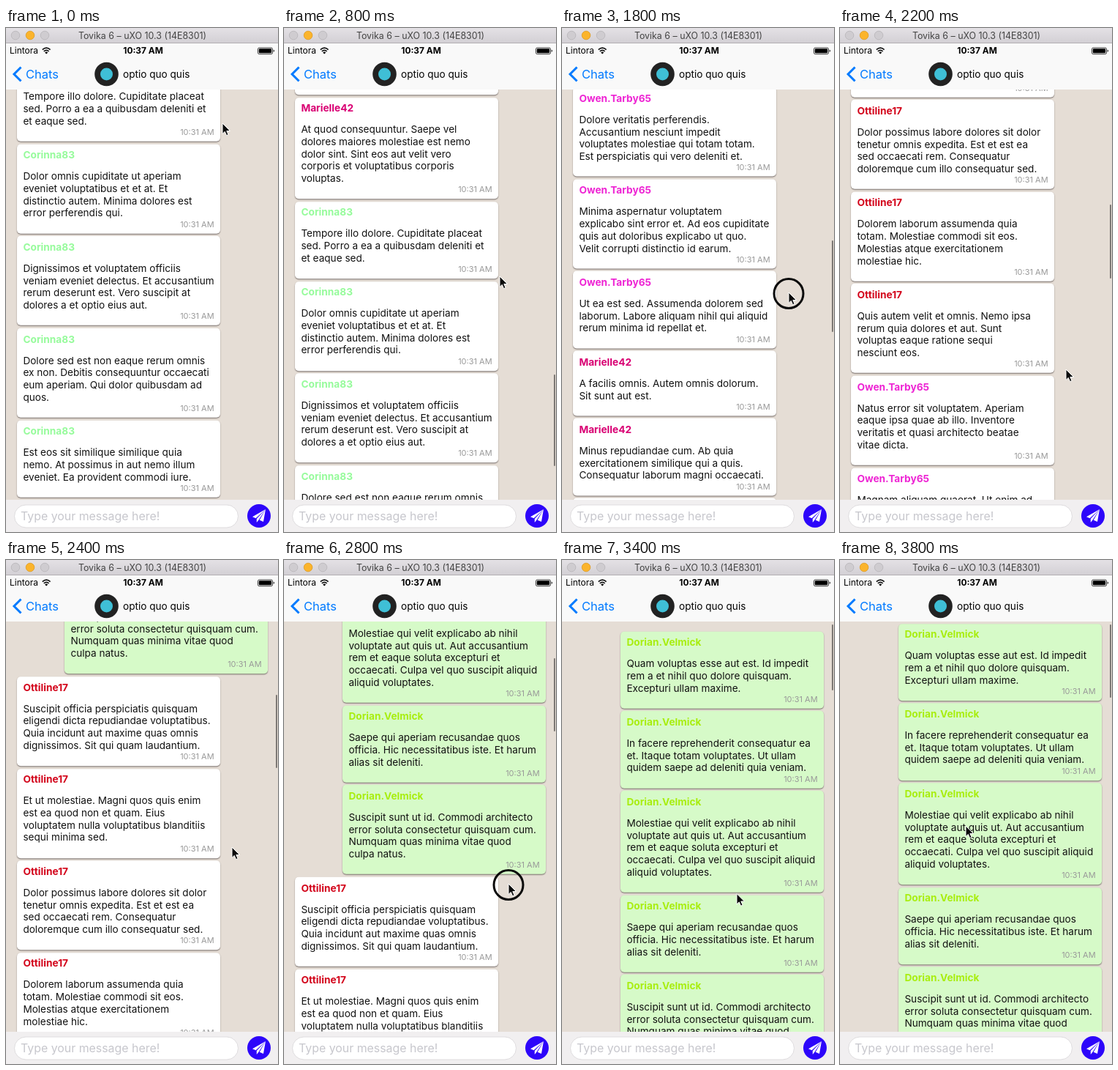
Animation of 372x688 px, one loop 4000 ms. Source, as an HTML page:

```html
<!DOCTYPE html>
<html lang="en">
<head>
<meta charset="utf-8">
<title>Chat scroll</title>
<style>
html, body { margin: 0; width: 100%; height: 100%; overflow: hidden; }
body { position: relative; background: #e5ddd5; font: 13.6px/16.7px Inter, Roboto, sans-serif; color: #111; }
#chat { position: absolute; left: 0; top: 84px; width: 372px; height: 560px; overflow: hidden; }
#list { position: absolute; left: 0; top: 2.5px; width: 372px; }
.card { position: relative; box-sizing: border-box; width: 278px; margin: 0 0 3.6px 15px; padding: 6.6px 8.4px;
  border-radius: 5px; background: #fff; box-shadow: 0 1px 1.5px rgba(40, 30, 30, .6); white-space: pre; }
.card.own { margin-left: 80px; background: #d6fac8; }
.card b { display: block; margin-bottom: 12.3px; font-size: 13.7px; }
.card time { position: absolute; right: 8.4px; bottom: 6px; font-size: 11px; line-height: 14px; color: #999; }
#bar { position: absolute; left: 368.5px; width: 2.5px; border-radius: 2px; background: #7d7875; }
svg { position: absolute; left: 0; top: 0; }
</style>
</head>
<body>
<div id="chat"><div id="list"></div></div>
<div id="bar"></div>
<svg width="372" height="688" viewBox="0 0 372 688">
  <defs>
    <linearGradient id="metal" x2="0" y2="1">
      <stop stop-color="#e4e1e5"/><stop offset="1" stop-color="#d2cfd4"/>
    </linearGradient>
  </defs>
  <rect width="372" height="21" fill="url(#metal)"/>
  <rect y="20" width="372" height="1" fill="#b3b0b4"/>
  <g stroke-width=".8">
    <circle cx="13" cy="10" r="5.8" fill="#cfccd0" stroke="#b8b5b9"/>
    <circle cx="33" cy="10" r="5.8" fill="#fbb42c" stroke="#dd9b20"/>
    <circle cx="53" cy="10" r="5.8" fill="#cfccd0" stroke="#b8b5b9"/>
  </g>
  <text x="186.5" y="15" font-size="12.4" fill="#444" text-anchor="middle">Tovika 6 – uXO 10.3 (14E8301)</text>

  <rect y="21" width="372" height="63" fill="#f9f9f9"/>
  <text x="5" y="35.3" font-size="12">Lintora</text>
  <g fill="none" stroke="#111" stroke-width="1.7">
    <path d="M49.8 29.6q5.4-4.8 10.8 0M51.8 31.8q3.4-3 6.8 0"/>
  </g>
  <path d="M53.2 33.4q2-1.6 4 0l-2 2.2z"/>
  <text x="187.5" y="35.3" font-size="11.9" font-weight="700" text-anchor="middle">10:37 AM</text>
  <rect x="344.5" y="27" width="20" height="8.6" rx="1.8" fill="none" stroke="#111" stroke-width=".8"/>
  <rect x="345.8" y="28.3" width="17.4" height="6" rx=".8"/>
  <path d="M365.8 29.6q2.4 1.7 0 3.4z"/>
  <path d="M20.5 53.5L11 63l9.5 9.5" fill="none" stroke="#007aff" stroke-width="3"/>
  <text x="27" y="69" font-size="16.5" fill="#007aff">Chats</text>
  <circle cx="137.5" cy="63" r="16.3" fill="#222"/>
  <circle cx="137.5" cy="63" r="8.5" fill="#3fbfd6"/>
  <text x="160" y="68" font-size="13.6">optio quo quis</text>

  <rect y="644" width="372" height="44" fill="#f1eff0"/>
  <rect x="11.5" y="651" width="306" height="31" rx="15.5" fill="#fff" stroke="#dedcde"/>
  <text x="20" y="671.5" font-size="15.9" fill="#c7c7cd">Type your message here!</text>
  <circle cx="346" cy="666" r="16" fill="#2d06fa"/>
  <path d="M355 657l-18 10.3 4.6 2zM355 657l-12.2 13v5l2.8-3.6zM355 657l-8.2 14.7 5.2 2.2z" fill="#fff"/>

  <g id="pointer">
    <circle id="press" r="20" cx="0" cy="1.5" fill="none" stroke="#0a0a0a" stroke-width="3"/>
    <path d="M0 0v14.5l3.3-3.1 2.3 5.3 2.5-1.1-2.3-5.1h4.7z" fill="#0a0a0a" stroke="#fff" stroke-width="1"/>
  </g>
</svg>
<script>
const LINE = 16.7, FRAME = 55.2, GAP = 3.6;

// Each sender: name, colour, messages with "|" as the line break.
const threads = [
  ["Dorian.Velmick", "#a8ee10", [
    "Quam voluptas esse aut est. Id impedit|rem a et nihil quo dolore quisquam.|Excepturi ullam maxime.",
    "In facere reprehenderit consequatur ea|et. Itaque totam voluptates. Ut ullam|quidem saepe ad deleniti quia veniam.",
    "Molestiae qui velit explicabo ab nihil|voluptate aut quis ut. Aut accusantium|rem et eaque soluta excepturi et|occaecati. Culpa vel quo suscipit aliquid|aliquid voluptates.",
    "Saepe qui aperiam recusandae quos|officia. Hic necessitatibus iste. Et harum|alias sit deleniti.",
    "Suscipit sunt ut id. Commodi architecto|error soluta consectetur quisquam cum.|Numquam quas minima vitae quod|culpa natus."]],
  ["Ottiline17", "#d3061c", [
    "Suscipit officia perspiciatis quisquam|eligendi dicta repudiandae voluptatibus.|Quia incidunt aut maxime quas omnis|dignissimos. Sit qui quam laudantium.",
    "Et ut molestiae. Magni quos quis enim|est ea quod non et quam. Eius|voluptatem nulla voluptatibus blanditiis|sequi minima sed.",
    "Dolor possimus labore dolores sit dolor|tenetur omnis expedita. Est et est ea|sed occaecati rem. Consequatur|doloremque cum illo consequatur sed.",
    "Dolorem laborum assumenda quia|totam. Molestiae commodi sit eos.|Molestias atque exercitationem|molestiae hic.",
    "Quis autem velit et omnis. Nemo ipsa|rerum quia dolores et aut. Sunt|voluptas eaque ratione sequi|nesciunt eos."]],
  ["Owen.Tarby65", "#ee25d4", [
    "Natus error sit voluptatem. Aperiam|eaque ipsa quae ab illo. Inventore|veritatis et quasi architecto beatae|vitae dicta.",
    "Magnam aliquam quaerat. Ut enim ad|minima veniam quis nostrum. Nisi ut|aliquid ex ea commodi consequatur|vel eum.",
    "Dolore veritatis perferendis.|Accusantium nesciunt impedit|voluptates molestiae qui totam totam.|Est perspiciatis qui vero deleniti et.",
    "Minima aspernatur voluptatem|explicabo sint error et. Ad eos cupiditate|quis aut doloribus explicabo ut quo.|Velit corrupti distinctio id earum.",
    "Ut ea est sed. Assumenda dolorem sed|laborum. Labore aliquam nihil qui aliquid|rerum minima id repellat et."]],
  ["Marielle42", "#d90073", [
    "A facilis omnis. Autem omnis dolorum.|Sit sunt aut est.",
    "Minus repudiandae cum. Ab quia|exercitationem similique qui a quis.|Consequatur laborum magni occaecati.",
    "Illo doloribus molestias ut alias modi|amet. Assumenda voluptatibus suscipit.|Veniam sint iure esse similique maxime|error non amet reprehenderit.",
    "Itaque earum rerum hic tenetur. Quo|sapiente delectus ut aut reiciendis|voluptatibus maiores. Alias|perferendis doloribus.",
    "At quod consequuntur. Saepe vel|dolores maiores molestiae est nemo|dolor sint. Sint eos aut velit vero|corporis et voluptatibus corporis|voluptas."]],
  ["Corinna83", "#97fb9c", [
    "Tempore illo dolore. Cupiditate placeat|sed. Porro a ea a quibusdam deleniti et|et eaque sed.",
    "Dolor omnis cupiditate ut aperiam|eveniet voluptatibus et et at. Et|distinctio autem. Minima dolores est|error perferendis qui.",
    "Dignissimos et voluptatem officiis|veniam eveniet delectus. Et accusantium|rerum deserunt est. Vero suscipit at|dolores a et optio eius aut.",
    "Dolore sed est non eaque rerum omnis|ex non. Debitis consequuntur occaecati|eum aperiam. Qui dolor quibusdam ad|quos.",
    "Est eos sit similique similique quia|nemo. At possimus in aut nemo illum|eveniet. Ea provident commodi iure."]]
];

const $ = id => document.getElementById(id);

$("list").innerHTML = threads.map(([name, color, messages], i) => messages.map(text => {
  const lines = text.split("|");
  const height = FRAME + LINE * lines.length;
  return `<div class="card${i ? "" : " own"}" style="height:${height}px"><b style="color:${color}">${name}</b>` +
    `${lines.join("\n")}<time>10:31 AM</time></div>`;
}).join("")).join("");

const END = 2465.2;
const OLDER = threads[0][2].reduce((sum, m) => sum + FRAME + GAP + LINE * m.split("|").length, 0);

// Pointer path: time, x, y
const path = [[0, 296, 130], [.6, 296, 151.5], [.8, 295, 339], [1.4, 312, 243], [1.6, 311, 289],
  [1.8, 310, 361], [2, 309, 540], [2.4, 309, 392], [2.6, 308, 378], [2.8, 307, 442], [3, 306, 548], [3.8, 172, 363]];
function pointerAt(t) {
  const n = Math.max(1, path.findIndex(p => p[0] >= t));
  const [a, b] = [path[n - 1], path[n]];
  const k = (t - a[0]) / (b[0] - a[0]);
  return [a[1] + (b[1] - a[1]) * k, a[2] + (b[2] - a[2]) * k];
}

// Drags: press time, release time, speed at release in px/s
const drags = [[.6, .8, 1820], [1.6, 2, 2828], [2.6, 3, 750]];
const DRAG = 2, SPRING = 12;
const coast = (speed, time) => speed / DRAG * (1 - Math.exp(-DRAG * time));

// Distance from the top: the list follows the pressed pointer, coasts when let go, and bounces at the top.
function scrollAt(t) {
  let y = END, since = 0, speed = 0;
  for (const [down, up, flick] of drags) {
    if (t < down) break;
    y -= coast(speed, down - since);
    y -= pointerAt(Math.min(t, up))[1] - pointerAt(down)[1];
    if (t < up) return y;
    since = up;
    speed = flick;
  }
  const rest = y - coast(speed, t - since);
  if (rest >= 0) return rest;
  const hit = since - Math.log(1 - y * DRAG / speed) / DRAG;
  return -(speed - DRAG * y) * (t - hit) * Math.exp(-SPRING * (t - hit));
}

function draw(now) {
  const step = Math.floor(now % 4000 / 200);
  const t = step / 5;
  const y = scrollAt(t);
  $("list").style.transform = `translateY(${-y}px)`;

  // The older messages lengthen the list once they have loaded.
  const start = step < 11 ? OLDER : 0;
  const size = 304500 / (END - start + 565);
  const bar = $("bar").style;
  bar.visibility = y === END ? "hidden" : "visible";
  bar.height = size + Math.min(0, y) + "px";
  bar.top = 88 + (553 - size) * Math.max(0, y - start) / (END - start) + "px";

  $("pointer").setAttribute("transform", `translate(${pointerAt(t)})`);
  $("press").style.visibility = drags.some(([down, up]) => t >= down && t < up) ? "visible" : "hidden";
}

const began = performance.now();
function loop() {
  draw(performance.now() - began);
  requestAnimationFrame(loop);
}
loop();
</script>
</body>
</html>
```
